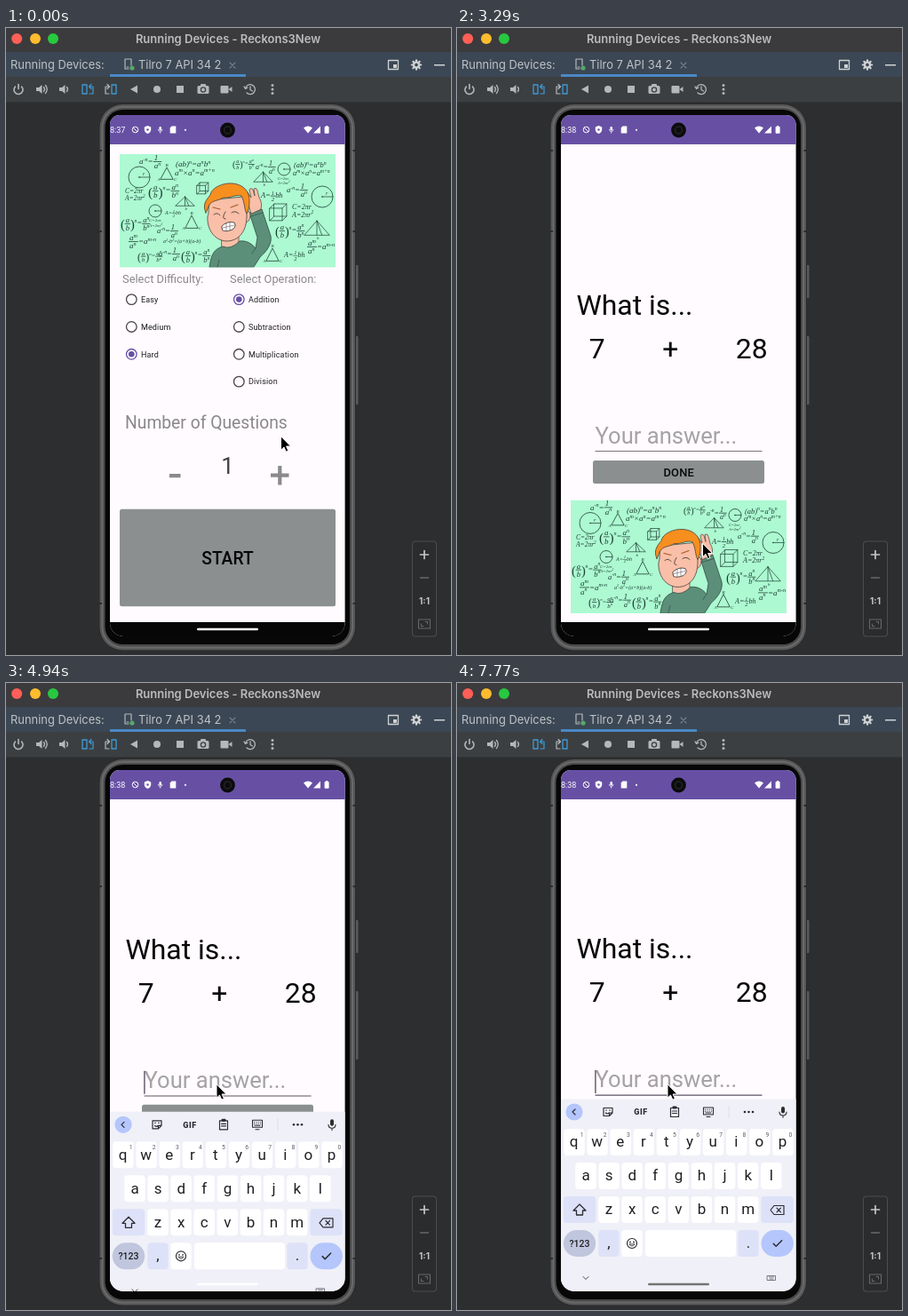
Recreate the animation shown at these times as an HTML page with a canvas. Size 501 by 706 pixels, loop 8 s.

```html
<!DOCTYPE html>
<html lang="en">
<head>
<meta charset="utf-8">
<title>Math quiz</title>
<style>
html, body { margin: 0; width: 100%; height: 100%; overflow: hidden; background: #2d2e30; }
canvas { display: block; width: 501px; height: 706px; }
</style>
</head>
<body>
<canvas id="stage"></canvas>
<script>
const W = 501, H = 706, LOOP = 8000;
const canvas = document.getElementById('stage');
const dpr = window.devicePixelRatio || 1;
canvas.width = W * dpr;
canvas.height = H * dpr;
const c = canvas.getContext('2d');

const UI = 'Inter, sans-serif';
const APP = 'Roboto, sans-serif';
const PURPLE = '#6750a4', PAPER = '#fffbfe', BUTTON = '#8b8f8f', INK = '#1f1f23';

// [time, x, y] of the pointer; it jumps from one place to the next
const pointer = [
  [0, 309.5, 460], [150, 315, 478], [300, 308.5, 495], [1650, 309, 495], [1950, 308.5, 495],
  [2540, 306, 502], [2690, 297, 528], [2840, 282, 566], [2990, 276.5, 580.5],
  [3890, 275, 572], [4040, 268, 543], [4190, 255, 500], [4340, 245, 468], [4490, 239, 455], [4640, 237, 452]
];
const counts = [[0, 1], [600, 2], [1200, 3]];
const lift = [[0, 0], [4790, -2], [4940, -12.2], [5090, -13]];
const keysDrop = [[0, 300], [4940, 14.3], [5090, 4], [5240, 1], [5390, 0]];
const caret = [[0, 0], [4790, 1], [5240, 0], [5690, 1], [6280, 0], [6720, 1], [7170, 0], [7770, 1]];
const handleFade = [[0, 0], [5690, .35], [5980, .7], [6280, .95], [6570, 1]];
const at = (list, t) => list.findLast(k => k[0] <= t);

function text(s, x, y, font, color, align = 'left', spacing = 0) {
  c.font = font;
  c.fillStyle = color;
  c.textAlign = align;
  c.letterSpacing = spacing + 'px';
  c.fillText(s, x, y);
  c.letterSpacing = '0px';
}
function box(x, y, w, h, color, r = 0) {
  c.fillStyle = color;
  c.beginPath();
  c.roundRect(x, y, w, h, r);
  c.fill();
}
function disc(x, y, r, color) {
  c.fillStyle = color;
  c.beginPath();
  c.arc(x, y, r, 0, 7);
  c.fill();
}
function ring(x, y, r, color, width = 1) {
  c.strokeStyle = color;
  c.lineWidth = width;
  c.beginPath();
  c.arc(x, y, r, 0, 7);
  c.stroke();
}
function shape(d, x, y, fill, line, width = 1) {
  const p = new Path2D(d);
  c.save();
  c.translate(x, y);
  c.lineCap = c.lineJoin = 'round';
  if (fill) { c.fillStyle = fill; c.fill(p); }
  if (line) { c.strokeStyle = line; c.lineWidth = width; c.stroke(p); }
  c.restore();
}
const stroke = (d, x, y, color, width) => shape(d, x, y, null, color, width);

function drawWindow() {
  const icon = '#b4b8bb', blue = '#3d9bd8', light = '#cfd2d4';
  box(0, 0, W, H, '#2d2e30');
  box(0, 0, W, 27, '#3b3b3d');
  disc(12.2, 12, 6, '#ff5f57');
  disc(33, 12, 6, '#febc2e');
  disc(53, 12, 6, '#28c840');
  text('Running Devices - Reckons3New', 250, 16.5, '600 13px ' + UI, '#bcbcbe', 'center');

  box(0, 27, W, 28, '#3b4754');
  text('Running Devices:', 5, 46, '12.9px ' + UI, '#bfc3c6');
  box(117, 52, 153, 3, '#4a88c7');
  stroke('M3 1V-6H-4V5H0M-2 3H0', 138, 41, icon, 1.2);
  disc(142, 45, 2.6, '#59a869');
  text('Tilro 7 API 34 2', 149, 46, '12.9px ' + UI, '#bfc3c6');
  stroke('M-3 -3L3 3M3 -3L-3 3', 255, 42, '#77818a', 1.1);
  stroke('M-5.5 -5H5.5V5H-5.5Z', 436, 41.5, light, 1.3);
  box(436, 41, 4, 4, light);
  for (let i = 0; i < 8; i++) {
    const a = i * Math.PI / 4;
    stroke(`M${3 * Math.cos(a)} ${3 * Math.sin(a)}L${5.2 * Math.cos(a)} ${5.2 * Math.sin(a)}`, 462, 41.5, light, 2.2);
  }
  ring(462, 41.5, 3, light, 2.2);
  box(482, 41, 12, 1.5, light);

  box(0, 55, W, 28, '#3c3f41');
  box(0, 83, W, 1, '#323436');
  c.strokeStyle = icon;
  c.lineWidth = 1.6;
  c.beginPath();
  c.arc(14, 69.5, 5, -.9, 4.04);
  c.stroke();
  stroke('M0 -6V-1', 14, 69.5, icon, 1.6);
  for (const x of [38, 64]) shape('M-4 -2H-1L2.5 -5V5L-1 2H-4Z', x, 69, icon);
  stroke('M4.5 -2.5Q6.5 0 4.5 2.5M6.5 -4.5Q10 0 6.5 4.5', 38, 69, icon, 1.3);
  stroke('M4.5 -2.5Q6.5 0 4.5 2.5', 64, 69, icon, 1.3);
  for (const [x, f] of [[92, 1], [118, -1]]) {
    c.save();
    c.translate(x, 69);
    c.scale(f, 1);
    stroke('M-6 -5H-1V5H-6Z', 0, 0, blue, 1.3);
    stroke('M2 5H6V-3H2M4 -5.5L1.5 -3L4 -.5', 0, 0, f > 0 ? blue : icon, 1.2);
    c.restore();
  }
  shape('M4 -4.5V4.5L-4 0Z', 144, 69, icon);
  disc(170, 69, 4, icon);
  box(192, 65, 8, 8, icon);
  box(215.5, 65, 13, 9, icon, 1.5);
  box(219, 63, 6, 3, icon, 1);
  ring(222, 69.5, 2.6, '#3c3f41', 1.3);
  box(241.5, 65, 9, 8.5, icon, 1);
  shape('M0 0L4 -3V3Z', 250.5, 69, icon);
  stroke('M-5.5 -1A5.5 5.5 0 1 1 -4 4M-7 -3L-5.5 -.5L-3 -2M0 -3V.5L2.5 2', 275, 69, icon, 1.3);
  for (const y of [64.5, 69, 73.5]) disc(300, y, 1.5, icon);

  // zoom panel
  box(457, 577.5, 28, 108, '#4b4d50', 4);
  box(458, 578.5, 26, 106, '#2b2c2e', 3);
  stroke('M-4.5 0H4.5M0 -4.5V4.5', 471, 593, '#c4c6c8', 1.7);
  stroke('M-4.5 0H4.5', 471, 619, '#66686a', 1.5);
  text('1:1', 471, 648.5, '700 10px ' + UI, '#c4c6c8', 'center');
  stroke('M-6.5 -5H6.5V5H-6.5ZM-3.5 0V2.5H-1M1 -2.5H3.5V0', 471, 671, '#66686a', 1.1);
}

function drawPhone() {
  box(393, 267, 3.5, 37, '#5a5a5b', 1);
  box(393, 347, 3.5, 77, '#5a5a5b', 1);
  box(104.5, 85, 289.5, 616.5, '#2a2a2b', 27);
  box(105.5, 86, 287.5, 614.5, '#575758', 26);
  box(107.5, 88, 283.5, 610.5, '#6a6a6b', 24);
  box(109.5, 90, 279.5, 606.5, '#4a4a4b', 22);
  box(111.5, 92, 275.5, 602, '#070707', 20);
  for (const y of [137, 228, 647]) {
    box(105, y, 3, 2, '#2c2c2d');
    box(390.5, y, 3, 2, '#2c2c2d');
  }
}

function drawStatus(t) {
  box(117, 98, 265, 33, PURPLE);
  text(t < 1650 ? '8:37' : '8:38', 117, 118.3, '9px ' + APP, '#fff');
  ring(145.5, 114.5, 3.3, '#fff', 1);
  stroke('M-2.2 -2.2L2.2 2.2', 145.5, 114.5, '#fff', 1);
  shape('M0 -4.5L3.7 -3V0Q3.5 3 0 4.5Q-3.5 3 -3.7 0V-3Z', 159.5, 114.5, '#fff');
  disc(159.5, 114.5, 1.2, PURPLE);
  box(172.5, 111, 2.4, 4.5, '#fff', 1.2);
  stroke('M-2.3 0Q-2 2.4 0 2.4Q2 2.4 2.3 0M0 2.4V4', 173.7, 114.3, '#fff', .7);
  shape('M-1.5 -4H3.3V4H-3.3V-2Z', 188, 114.5, '#fff');
  disc(202, 114.8, 1.1, '#fff');
  shape('M0 4L-5 -2Q0 -6 5 -2Z', 340, 114.5, '#fff');
  shape('M4 -4V4H-4Z', 350, 114.5, '#fff');
  box(358.6, 111, 5, 7.8, '#fff', .8);
  box(360, 110, 2.2, 1.5, '#fff');
  disc(249.5, 115, 8.4, '#0b0b0c');
  ring(249.5, 115, 4, '#242428', 1.5);
}

// A caret in the string switches superscript on and off.
const LINE = '#1c4033';
function math(s, x, y, size) {
  s.split('^').forEach((part, i) => {
    text(part, x, y - (i % 2) * size * .38, `italic ${i % 2 ? size * .68 : size}px "Liberation Serif", serif`, LINE);
    x += c.measureText(part).width;
  });
  return x;
}
function frac(a, b, x, y, size) {
  const end = math(a, x + 1, y - size * .45, size);
  const end2 = math(b, x + 1, y + size * .6, size);
  const right = Math.max(end, end2) + 1;
  box(x, y - size * .33, right - x, .7, LINE);
  return right;
}
const inverse = (x, y, s) => frac('1', 'a^n^', math('a^-n^=', x, y, s), y, s);
function ratio(x, y, s) {
  const bracket = `${s * 1.7}px "Liberation Serif", serif`;
  text('(', x, y + s * .4, bracket, LINE);
  const e = frac('a', 'b', x + s * .55, y, s);
  text(')', e, y + s * .4, bracket, LINE);
  const m = math('^n^=', e + s * .55, y - s * .1, s);
  frac('a^n^', 'b^n^', m, y, s);
}
function powers(x, y, s) {
  math('(ab)^n^=a^n^b^n^', x, y, s);
  math('a^m^×a^n^=a^m+n^', x - 1, y + s + .5, s);
}
const division = (x, y, s) => math('=a^m-n^', frac('a^m^', 'a^n^', x, y, s), y, s);
const half = (x, y, s) => math('bh', frac('1', '2', math('A=', x, y, s), y, s * .8), y, s);
function circleArea(x, y, s) {
  math('C=2πr', x, y, s);
  math('A=2πr^2^', x, y + s + .5, s);
}
function circle(x, y, r) {
  ring(x, y, r, LINE, .8);
  stroke(`M0 0H${r}`, x, y, LINE, .7);
  disc(x, y, .8, LINE);
  if (r > 9) math('r', x + 4, y - 2, 6);
}
function triangle(x, y, w, h) {
  stroke(`M0 ${h}L${w / 2} 0L${w} ${h}Z`, x, y, LINE, .8);
  math('A', x - 3.5, y + h + 2, 5);
  math('B', x + w / 2 - 1.5, y - 1, 5);
  math('C', x + w + 1, y + h + 2, 5);
}
function pyramid(x, y, w, h) {
  stroke(`M0 ${h}L${w * .5} 0L${w} ${h}ZM${w * .5} 0V${h}M${w * .5} 0L${w * .7} ${h}`, x, y, LINE, .7);
  math('b', x + w / 2, y + h + 5, 5);
}
function cube(x, y, s) {
  const d = s * .35, e = s + d;
  stroke(`M0 ${d}H${s}V${e}H0ZM${d} 0H${e}V${s}H${d}ZM0 ${d}L${d} 0M${s} ${d}L${e} 0M${s} ${e}L${e} ${s}M0 ${e}L${d} ${s}`, x, y, LINE, .7);
}

function drawBoy() {
  const edge = '#4a3f3c', seam = '#2f4f43', skin = '#f9bfa8', knit = '#5c8f79';
  shape('M115 92H134V106H115Z', 0, 0, skin, edge, .7);
  shape('M101 127C103 113 106 107 116 104Q125 108 135 98C142 97 148 100 153 106L155 94L146 66L160 62L170 92C172 101 165 110 158 116L151 127Z', 0, 0, knit, seam, .8);
  stroke('M153 106L149 112M148 70L161 66M110 127L112 119', 0, 0, seam, .7);
  shape('M148 67L144 54C140 47 141 42 144 43L148 49L146 40Q148 37 150 40L152 47L151 39Q154 37 155 41L157 49Q161 55 159 62Z', 0, 0, skin, edge, .7);
  shape('M140 67Q146 61 147 68Q147 77 141 77Z', 0, 0, skin, edge, .7);
  shape('M102 52C99 60 101 66 99 70C98 84 106 97 120 98C134 98 143 87 143 70V48Z', 0, 0, skin, edge, .8);
  shape('M97 66C93 57 97 52 102 46C103 38 116 32 127 33C139 34 147 42 146 54C146 60 145 64 143 67C140 62 141 54 137 47C130 45 125 50 117 49C110 53 104 52 101 57C99 60 99 63 97 66Z', 0, 0, '#f78f1e', edge, .8);
  stroke('M105 60L113 62M125 60L133 57', 0, 0, '#a85a21', 1.2);
  stroke('M106 68Q110 65 113 69M126 66Q130 63 134 67M119 65Q114 73 119 73', 0, 0, edge, .9);
  shape('M115 81Q121 75 129 77Q132 81 127 85Q119 88 116 86Z', 0, 0, '#fff', edge, .9);
  stroke('M116 83L129 80M120 78V86M124 76.5V85.5', 0, 0, edge, .5);
}

function drawBanner(y) {
  c.save();
  c.translate(128, y);
  c.beginPath();
  c.rect(0, 0, 243, 127.5);
  c.clip();
  box(0, 0, 243, 128, '#adf9d2');
  inverse(22, 11, 9);
  powers(63, 14, 9);
  ratio(127, 13, 6);
  inverse(153, 17, 8);
  powers(196, 15, 8.4);
  triangle(46, 15, 14, 13);
  circle(22, 26, 12);
  circleArea(6, 44, 7.5);
  ratio(32, 44, 9);
  cube(87, 32, 9.5);
  pyramid(151, 20, 21, 11);
  circle(185, 17, 7);
  circleArea(178, 29, 4.5);
  pyramid(63, 48, 21, 10);
  inverse(188, 43, 8.5);
  half(159, 49, 8.4);
  circle(228, 48, 12);
  circle(40, 64, 7);
  half(51, 68, 6);
  circleArea(33, 76, 5);
  triangle(74, 69, 14, 14);
  cube(169, 56, 14);
  circleArea(194, 62, 8);
  ratio(1, 81, 8.5);
  inverse(42, 89, 8.5);
  pyramid(208, 75, 28, 16);
  ratio(175, 89, 8.5);
  division(10, 101, 9);
  math('a^2^-b^2^=(a+b)(a-b)', 49, 100, 6);
  ratio(20, 117, 7);
  inverse(44, 115, 8.5);
  ratio(69, 117, 8.5);
  division(211, 107, 9);
  triangle(165, 106, 14, 14);
  half(185, 116, 8);
  drawBoy();
  c.restore();
}

function drawSetup(t) {
  drawBanner(142);
  const title = '12.87px ' + APP, label = '9px ' + APP;
  text('Select Difficulty:', 131, 286.5, title, '#8a888b');
  text('Select Operation:', 252, 286.5, title, '#8a888b');
  const radios = (x, names, chosen) => names.forEach((name, i) => {
    const y = 305.6 + i * 30.85, on = i === chosen;
    ring(x, y, 5.8, on ? PURPLE : '#49454f', 1.3);
    if (on) disc(x, y, 3.3, PURPLE);
    text(name, x + 10.6, y + 3.2, label, INK, 'left', .16);
  });
  radios(141.3, ['Easy', 'Medium', 'Hard'], 2);
  radios(262.3, ['Addition', 'Subtraction', 'Multiplication', 'Division'], 0);
  text('Number of Questions', 134, 451, '19.3px ' + APP, '#8a888b');
  text(at(counts, t)[1], 249.4, 501.5, '25.74px ' + APP, '#434046', 'center');
  box(184, 502, 12.5, 4.2, '#8a8a8c');
  box(298, 501.6, 20.5, 4.2, '#8a8a8c');
  box(306.2, 493, 4.2, 21.5, '#8a8a8c');
  box(128, 541.8, 243, 109.4, BUTTON, 2.5);
  text('START', 249.5, 603.8, '500 19.3px ' + APP, '#050505', 'center');
}

function drawQuestion(t) {
  const big = '31.9px ' + APP, focused = t >= 4790;
  c.save();
  c.translate(0, at(lift, t)[1]);
  text('What is...', 134.5, 323, big, '#080808');
  text('7', 157.7, 371.8, big, '#080808', 'center');
  text('+', 240.3, 371.8, big, '#080808', 'center');
  text('28', 331.7, 371.8, big, '#080808', 'center');
  text('Your answer...', 155.5, 468, '25.6px ' + APP, '#a5a3a6');
  box(155.5, focused ? 476.6 : 476, 188, focused ? 1.2 : 1, focused ? '#5d5266' : '#79747e');
  if (at(caret, t)[1]) box(155.2, 449, 1.4, 26, '#5d5266');
  box(153, 487, 193, 26, BUTTON, 2.5);
  text('DONE', 249.7, 504.8, '500 12.87px ' + APP, '#080808', 'center', .2);
  drawBanner(531.5);
  c.restore();
}

function drawKeyboard(drop) {
  const soft = '#dde2f8', accent = '#b4c6fc', pitch = 26.1, mark = '#2b2d33';
  c.save();
  c.translate(0, drop);
  box(117, 468.5, 265, 240, '#f0f0f8');

  disc(132, 483, 9.6, accent);
  stroke('M1.5 -3L-1.5 0L1.5 3', 131.5, 483, mark, 1.2);
  stroke('M-5 -4.5H5V1L1.5 4.5H-5ZM5 1H1.5V4.5M-2.5 1Q-.5 3 1 1', 170, 483, mark, 1.2);
  disc(168, 481, .8, mark);
  disc(172, 481, .8, mark);
  text('GIF', 207, 486.3, '900 9px ' + APP, mark, 'center', .5);
  stroke('M-4.5 -4.5H4.5V5.5H-4.5ZM-2.5 -1H2.5M-2.5 1.5H2.5', 245, 483, mark, 1.2);
  box(242.5, 476.5, 5, 3, mark, 1);
  stroke('M-5.5 -5H5.5V3H-5.5ZM-3 1H3M-2 5.5H2', 283, 483, mark, 1.1);
  for (let i = 0; i < 8; i++) box(279 + (i % 4) * 2.3, 479.8 + (i >> 2) * 2, 1, 1, mark);
  box(305.5, 476, 1, 14, '#dcdde5');
  for (const x of [324, 328.5, 333]) disc(x, 483, 1.3, mark);
  box(365, 477, 4, 7.5, mark, 2);
  stroke('M-4 0Q-4 4 0 4Q4 4 4 0M0 4V6.3', 367, 483, mark, 1.1);

  const key = (x, y, w, color, r = 4) => box(x - w / 2, y - 15, w, 30, color, r);
  ['qwertyuiop', 'asdfghjkl', 'zxcvbnm'].forEach((row, r) => {
    const x0 = [132, 145, 171][r], y = 517 + r * 38;
    [...row].forEach((ch, i) => {
      const x = x0 + i * pitch;
      key(x, y, 23.4, '#fff');
      text(ch, x - (r ? 0 : .5), y + 5.2, '17px ' + APP, INK, 'center');
      if (!r) text((i + 1) % 10, x + 8.6, y - 6, '6.8px ' + APP, '#5b5d66', 'center');
    });
  });
  key(138, 593, 36.4, soft);
  stroke('M0 -6L7 1H3.5V6H-3.5V1H-7Z', 138, 593, mark, 1.3);
  key(360.5, 593, 36.4, soft);
  stroke('M-8 0L-4 -5H7V5H-4ZM-1 -2.3L3.5 2.3M3.5 -2.3L-1 2.3', 361, 593.5, mark, 1.2);

  key(138, 631, 36.4, '#bfc6dd', 15);
  text('?123', 138, 634.8, '500 10.5px ' + APP, INK, 'center');
  key(171, 631, 23.4, soft);
  text(',', 171, 636, '17px ' + APP, INK, 'center');
  key(197, 631, 23.4, '#fff');
  ring(197, 631, 5.5, mark, 1.2);
  disc(195, 629.5, .9, mark);
  disc(199, 629.5, .9, mark);
  stroke('M-2.8 0Q0 4 2.8 0Z', 197, 632.2, mark, .9);
  key(263, 631, 102, '#fff');
  key(328, 631, 23.4, soft);
  text('.', 328, 636, '17px ' + APP, INK, 'center');
  key(360.7, 631, 36.4, accent, 15);
  stroke('M-4.5 .3L-1.5 3.3L5 -3.3', 360.7, 631, mark, 1.5);

  stroke('M-3 -1.5L0 1.5L3 -1.5', 145, 670, '#44464e', 1);
  stroke('M-4.5 -2.5H4.5V2.5H-4.5ZM-2 1H2M-2.5 -1H2.5', 354, 670, '#6a6c74', .9);
  c.restore();
}

function draw(t) {
  c.setTransform(dpr, 0, 0, dpr, 0, 0);
  drawWindow();
  drawPhone();

  c.save();
  c.beginPath();
  c.roundRect(117, 98, 264.6, 587, [11, 11, 15, 15]);
  c.clip();
  box(117, 98, 265, 587, PAPER);
  if (t < 3290) drawSetup(t);
  else drawQuestion(t);
  drawStatus(t);
  if (t < 4940) {
    const top = t < 4790 ? 669 : 668;
    box(117, top, 265, 685 - top, '#060606');
  } else {
    drawKeyboard(at(keysDrop, t)[1]);
  }
  const tone = Math.round(255 - 140 * at(handleFade, t)[1]);
  box(215, 675.8, 69, 2.4, `rgb(${tone},${tone},${tone})`, 1.2);
  c.restore();

  const [, x, y] = at(pointer, t);
  shape('M0 0V15.2L3.5 12L5.8 17.2L8.4 16L6.1 11H10.8Z', x, y, '#000', '#fff', 1);
}

const start = performance.now();
function tick() {
  draw((performance.now() - start) % LOOP);
  requestAnimationFrame(tick);
}
tick();
</script>
</body>
</html>
```
